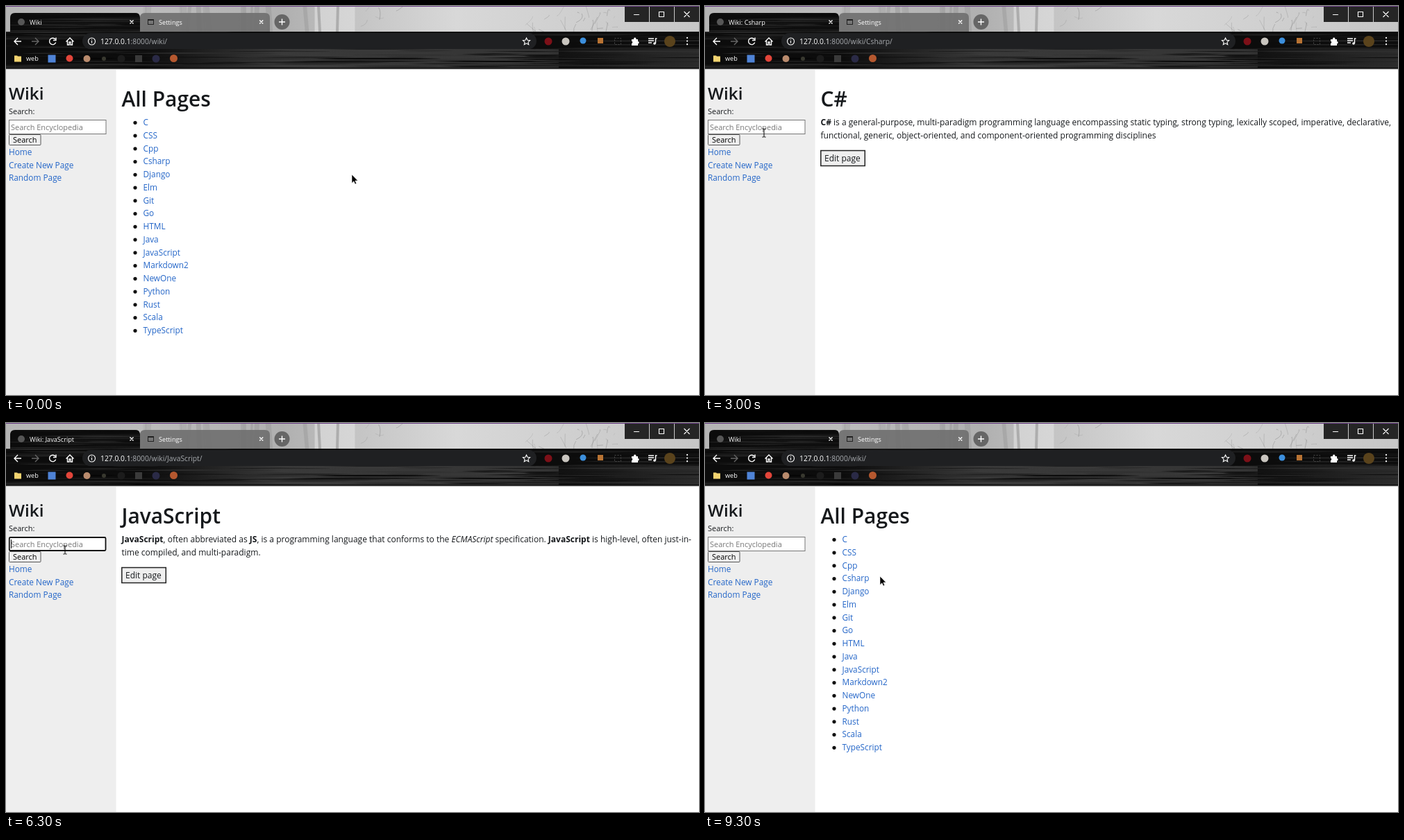
Write an HTML page that moves like this. It is 998 px wide and 561 px high and loops after 9500 ms.

```html
<!DOCTYPE html>
<html lang="en">
<head>
<meta charset="utf-8">
<title>Wiki</title>
<style>
  html, body { margin: 0; width: 100%; height: 100%; overflow: hidden; background: #fff; }
  svg { display: block; width: 998px; height: 561px; }
  text { font: 11.8px "Open Sans", "Noto Sans", sans-serif; fill: #16191c; white-space: pre; }
  .b { font-weight: 700; }
  .i { font-style: italic; }
  .h1 { font-size: 29.9px; font-weight: 600; }
  .h2 { font-size: 24.3px; font-weight: 600; }
  .p { font-size: 12.03px; }
  .form { font-size: 10.95px; }
  .tab { font-size: 9.15px; fill: #fff; }
  .url { font-size: 10.3px; fill: #a8abaf; }
  .link { fill: #2466c8; }
  .hover { fill: #0f56a8; text-decoration: underline; }
  .line { fill: none; stroke: #fff; stroke-width: 1.4; }
  .thin { stroke-width: 1.1; }
  .off { stroke: #666; }
</style>
</head>
<body>
<svg viewBox="0 0 998 561">
  <defs>
    <linearGradient id="fog">
      <stop offset="0" stop-color="#b4b4b4"/><stop offset=".2" stop-color="#bcbcbc"/>
      <stop offset=".4" stop-color="#b0b0b0"/><stop offset=".445" stop-color="#b8b8b8"/>
      <stop offset=".446" stop-color="#d2d2d2"/><stop offset=".503" stop-color="#d6d6d6"/>
      <stop offset=".504" stop-color="#c4c4c4"/><stop offset=".65" stop-color="#d8d8d8"/>
      <stop offset="1" stop-color="#c6c6c6"/>
    </linearGradient>
    <linearGradient id="sheen">
      <stop offset=".2" stop-color="#0c0c0c"/><stop offset=".4" stop-color="#3a3a3a"/>
      <stop offset=".78" stop-color="#343434"/><stop offset=".797" stop-color="#303030"/>
      <stop offset=".798" stop-color="#111"/><stop offset="1" stop-color="#2c2c2c"/>
    </linearGradient>
    <clipPath id="wood">
      <path d="M0 37H6V17Q6 10 13 10H186Q193 10 193 17V37H998V90H0Z"/>
    </clipPath>
    <clipPath id="sky"><path d="M0 1H998V37H0Z"/></clipPath>
  </defs>

  <rect width="998" height="37" fill="url(#fog)"/>
  <g id="forest" clip-path="url(#sky)" fill="none"></g>
  <path d="M0 .5H998" stroke="#6b3f86"/>
  <path d="M193 37V17Q193 10 200 10H373Q380 10 380 17V37Z" fill="#6f6f6f" fill-opacity=".9"/>
  <g clip-path="url(#wood)">
    <rect width="998" height="90" fill="#0c0c0c"/>
    <rect y="62" width="998" height="28" fill="url(#sheen)"/>
    <g id="grain"></g>
  </g>
  <rect x="110" y="39" width="654" height="23" rx="11.5" fill="#1f2022"/>
  <rect y="90" width="998" height="2" fill="#d8d8d8"/>
  <rect y="89" width="998" height="1.6" fill="#050505"/>

  <circle id="favicon" cx="22" cy="23" r="5" fill="#565656"/>
  <text id="title" class="tab" x="34" y="26.6"></text>
  <rect x="204.5" y="19.5" width="8" height="7" fill="none" stroke="#222"/>
  <path d="M204 20H213" stroke="#222" stroke-width="2"/>
  <text class="tab" x="220" y="26.6">Settings</text>
  <path class="line" d="M178.5 20.5l5 5m0-5l-5 5M365.2 20.5l5 5m0-5l-5 5"/>
  <circle cx="397.5" cy="23" r="11" fill="#666"/>
  <path class="line" d="M393 23h9M397.5 18.5v9"/>
  <path d="M891 1h35v22h-35zM927 1h35v22h-35zM963 1h35v22h-35z" fill="#252525"/>
  <path class="line thin" d="M904 12.5h8M940.5 8.5h7v7h-7zM976.5 8l8 8m0-8l-8 8"/>

  <path class="line" d="M22 51H12.5M17 46l-5 5 5 5"/>
  <path class="line off" d="M37 51h9.5M42 46l5 5-5 5"/>
  <path class="line" d="M71 48A4.7 4.7 0 1 0 71.7 52.5M72 45.5v4h-4"/>
  <path class="line" d="M86.500 51.500L92 46l5.500 5.500M88.500 50v6h2.500v-4h2v4h2.500v-6"/>
  <circle class="line thin" cx="123.5" cy="51" r="5"/>
  <path class="line thin" d="M123.5 50v3.5M123.5 47.8v1"/>
  <text class="url" x="136" y="54.8"><tspan fill="#fff">127.0.0.1</tspan><tspan id="path"></tspan></text>
  <path class="line thin" d="M749.5 46l1.5 3.300 3.600.4-2.700 2.400.8 3.600-3.200-1.900-3.200 1.900.8-3.600-2.700-2.400 3.600-.4z"/>
  <g id="icons"></g>
  <rect x="876.5" y="46.5" width="9" height="9" fill="none" stroke="#4a4a4a" stroke-dasharray="2 2"/>
  <path d="M901 48h3a1.800 1.800 0 1 1 3.400 0h2.600v3a1.700 1.700 0 1 1 0 3.400v2.600h-9v-3a1.700 1.700 0 0 0 0-3.300z" fill="#fff"/>
  <path class="line" d="M925 47h8M925 50h8M925 53h5M935.5 54v-7h2"/>
  <circle cx="934" cy="54" r="1.8" fill="#fff"/>
  <path d="M981 45.800v.1M981 50.500v.1M981 55.200v.1" stroke="#fff" stroke-width="2.2" stroke-linecap="round"/>
  <path d="M12 71.500h4l1 1h5v8H12z" fill="#f3d370"/>
  <text class="tab" x="29" y="79">web</text>

  <rect y="92" width="158.5" height="469" fill="#eee"/>
  <text class="h2" x="4" y="135">Wiki</text>
  <text class="form" x="4" y="156.3">Search:</text>
  <rect id="box" fill="#fff"/>
  <text id="query" class="form" x="7" y="178.7"></text>
  <path id="caret" stroke="#111"/>
  <rect x="4.5" y="185.5" width="45.5" height="15" rx="1" fill="#efefef" stroke="#555"/>
  <text class="form" x="10" y="196.8" style="fill:#000">Search</text>
  <text id="home" class="link" x="4" y="215">Home</text>
  <text class="link" x="4" y="233.7">Create New Page</text>
  <text class="link" x="4" y="252.4">Random Page</text>
  <g id="content"></g>
  <g id="cursor"></g>
</svg>
<script>
const $ = id => document.getElementById(id);

let seed = 7;
const rnd = (a = 0, b = 1) => {
  seed = (seed * 16807) % 2147483647;
  return a + (b - a) * seed / 2147483647;
};
const many = (n, fn) => Array.from({ length: n }, (_, i) => fn(i)).join('');

// Wood grain: long thin lens shapes, pale on the dark rows and dark on the sheen
$('grain').innerHTML = many(170, i => {
  const y = i < 30 ? rnd(10, 38) : rnd(37, 90);
  const x = i < 30 ? rnd(-40, 120) : rnd(-80, 940);
  const w = rnd(60, 260), h = rnd(.6, 2.2), bend = rnd(-1.5, 1.5);
  const c = Math.round(y > 62 ? rnd(2, 62) : rnd(10, 44));
  return `<path d="M${x} ${y}q${w / 2} ${bend - h} ${w} 0q${-w / 2} ${bend + h} ${-w} 0" fill="rgb(${c},${c},${c})"/>`;
});

// Misty trunks on the left, bare branches on the right
$('forest').innerHTML = many(14, () => {
  const x = rnd(200, 440);
  return `<path d="M${x} 0l${rnd(-4, 4)} 37" stroke="#888" stroke-opacity="${rnd(.1, .35)}" stroke-width="${rnd(2, 9)}"/>`;
}) + many(30, i => {
  const x = i < 5 ? rnd(515, 570) : rnd(740, 890);
  return `<path d="M${x} ${rnd(0, 37)}q${rnd(-5, 5)} ${rnd(-8, 8)} ${rnd(-14, 14)} ${rnd(-20, 20)}" stroke="#777" stroke-opacity="${rnd(.15, .4)}"/>`;
}) + '<path d="M450 0l2 37M478 0l-1 37" stroke="#888" stroke-width="4" stroke-opacity=".5"/>';

const dot = (x, y, r, c) => `<circle cx="${x}" cy="${y}" r="${r}" fill="${c}"/>`;
const tile = (x, y, s, c) => `<rect x="${x - s / 2}" y="${y - s / 2}" width="${s}" height="${s}" fill="${c}"/>`;
$('icons').innerHTML =
  dot(781, 51, 5.5, '#7d1018') + dot(806, 51, 5.5, '#c9c5bf') + dot(831, 50, 4.5, '#3c8fdc') +
  tile(856, 50, 8, '#b87333') + dot(956, 51, 8, '#5a431c') +
  tile(66, 76, 11, '#4f83d6') + dot(91.5, 75.5, 5, '#e2453a') + dot(116.5, 76, 5, '#b98b6d') +
  dot(141, 76, 3, '#38382f') + dot(166, 76, 5.5, '#1c1c1c') + tile(191, 76, 10, '#3a3a3a') +
  dot(216, 76, 5.5, '#2a2a46') + dot(241.5, 75.5, 5.5, '#b5582f');

const text = (x, y, cls, s) => `<text x="${x}" y="${y}" class="${cls}">${s}</text>`;
const bold = s => `<tspan class="b">${s}</tspan>`;
const names = 'C CSS Cpp Csharp Django Elm Git Go HTML Java JavaScript Markdown2 NewOne Python Rust Scala TypeScript'.split(' ');

const article = (head, ...lines) => {
  const y = 189.8 + 18.7 * (lines.length - 1);
  return text(166.5, 145, 'h1', head) +
    lines.map((s, i) => text(166.5, 172 + 18.7 * i, 'p', s)).join('') +
    `<rect x="166.8" y="${y}" width="63.5" height="22" fill="#efefef" stroke="#222" stroke-width="1.5"/>` +
    text(172, y + 15.7, 'p', 'Edit page');
};

const pages = {
  '': text(166.5, 145, 'h1', 'All Pages') + names.map((n, i) =>
    dot(186, 168.3 + 18.75 * i, 2.6, '#111') + text(197.5, 172 + 18.75 * i, 'link', n)).join(''),
  Csharp: article('C#',
    bold('C#') + ' is a general-purpose, multi-paradigm programming language encompassing static typing, strong typing, lexically scoped, imperative, declarative,',
    'functional, generic, object-oriented, and component-oriented programming disciplines'),
  JavaScript: article('JavaScript',
    `${bold('JavaScript')}, often abbreviated as ${bold('JS')}, is a programming language that conforms to the <tspan class="i">ECMAScript</tspan> specification. ${bold('JavaScript')} is high-level, often just-in-`,
    'time compiled, and multi-paradigm.'),
  Python: article('Python',
    `Python is a programming language that can be used both for writing ${bold('command-line scripts')} or building ${bold('web applications')}.`)
};

const visits = [[0, ''], [2800, 'Csharp'], [5600, 'JavaScript'], [7500, 'Python'], [9000, '']];
const searches = [
  { from: 1000, to: 2800, word: 'csharp', keys: [1900, 2000, 2200, 2300, 2400, 2500] },
  { from: 3600, to: 5600, word: 'javascript', keys: [3900, 4000, 4100, 4200, 4500, 4900, 5000, 5100, 5200, 5300] },
  { from: 6200, to: 7500, word: 'python', keys: [6600, 6700, 6800, 6900, 7000, 7200] }
];
// time, x, y of the pointer
const route = [[0, 498, 243], [100, 498, 243], [900, 85, 183], [8200, 85, 183],
  [8600, 35, 219.5], [8900, 35, 219.5], [9300, 252, 221], [9500, 252, 221]];

const shapes = {
  arrow: '<path d="M0 0V12.5L2.900 9.800 4.800 14 6.700 13.100 4.900 9H8.700Z" fill="#000" stroke="#fff" stroke-width=".6"/>',
  beam: '<path d="M-2.500 -6H-.6L0 -5.400 .6 -6H2.500M0 -5.400V5.400M-2.500 6H-.6L0 5.400 .6 6H2.500" fill="none" stroke="#000"/>',
  hand: '<path d="M-1.500 1Q0 -1 1.300 1V6Q2.500 5 3.700 6.300 5 5.500 6 7 8 6.500 8 8.500V12L6.500 16H0L-4.500 10Q-4.500 8 -2.500 9L-1.500 10Z" fill="#fff" stroke="#000"/><path d="M1.300 6V9M3.700 6.300V9M6 7V9.500" stroke="#000" stroke-width=".8"/>'
};

const idleBox = { x: 4.5, y: 164.5, width: 139.5, height: 20, rx: 0, stroke: '#767676', 'stroke-width': 1 };
const focusBox = { x: 4.8, y: 165, width: 138.7, height: 19, rx: 1.5, stroke: '#101010', 'stroke-width': 1.8 };

function pointer(t) {
  const k = route.findIndex((r, i) => i && t < r[0]);
  const [a, b] = [route[k - 1], route[k]];
  const u = (t - a[0]) / (b[0] - a[0]), e = u * u * (3 - 2 * u);
  return [a[1] + (b[1] - a[1]) * e, a[2] + (b[2] - a[2]) * e];
}

let shown = null, last = -1;

function draw(t) {
  const [since, page] = visits.filter(v => v[0] <= t).pop();
  if (page !== shown) {
    $('content').innerHTML = pages[page];
    $('title').textContent = page ? 'Wiki: ' + page : 'Wiki';
    $('path').textContent = ':8000/wiki/' + (page && page + '/');
    shown = page;
  }
  $('favicon').setAttribute('opacity', since && t - since < 200 ? .35 : 1);

  const s = searches.find(s => t >= s.from && t < s.to);
  const pressed = s ? s.keys.filter(k => k <= t) : [];
  const typed = s ? s.word.slice(0, pressed.length) : '';
  const q = $('query');
  q.textContent = typed || 'Search Encyclopedia';
  q.style.fill = typed ? '#222' : '#777';
  const box = s ? focusBox : idleBox;
  for (const k in box) $('box').setAttribute(k, box[k]);

  // The caret restarts its blink at focus and at each key
  const lit = s && (t - Math.max(s.from, ...pressed)) % 1000 < 500;
  const cx = 7.5 + (typed ? q.getComputedTextLength() : 0);
  $('caret').setAttribute('d', lit ? `M${cx} 168v13` : '');

  const [x, y] = pointer(t);
  const onHome = x < 38 && y > 204 && y < 220;
  const onBox = x > 4 && x < 144 && y > 164 && y < 185;
  $('home').setAttribute('class', onHome ? 'hover' : 'link');
  $('cursor').innerHTML = shapes[onHome ? 'hand' : onBox ? 'beam' : 'arrow'];
  $('cursor').setAttribute('transform', `translate(${x} ${y})`);
}

const start = performance.now();
function tick() {
  const t = Math.floor((performance.now() - start) % 9500 / 100) * 100;
  if (t !== last) draw(last = t);
  requestAnimationFrame(tick);
}
tick();
</script>
</body>
</html>
```
